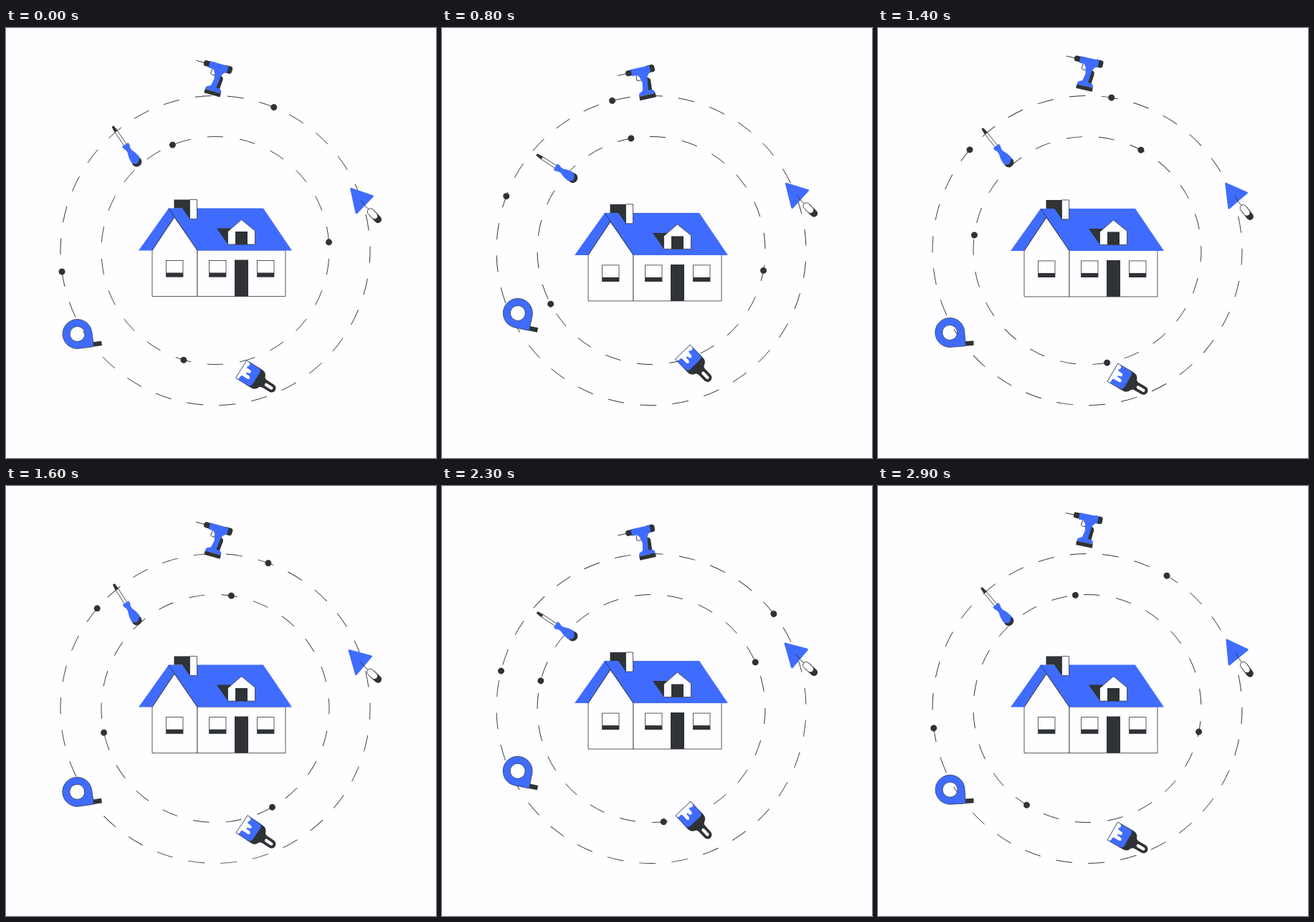
Recreate the animation shown at these times as an HTML page. Size 600 px wide and 600 px high, loop 3000 ms.

```html
<!DOCTYPE html>
<html lang="en">
<head>
<meta charset="utf-8">
<title>Home repair</title>
<style>
  html, body { margin: 0; width: 100%; height: 100%; overflow: hidden; background: #fefdff; }
  svg { display: block; width: 100vw; height: 100vh; }
  .b { fill: #3f6cff; }
  .d { fill: #2f3335; }
  .w { fill: #fefdff; stroke: #2f3335; stroke-width: .8; }
  .l { fill: none; stroke: #2f3335; stroke-width: .9; }
  .o { stroke: #2f3335; stroke-width: .7; stroke-linejoin: round; }
</style>
</head>
<body>
<svg viewBox="0 0 600 600" xmlns="http://www.w3.org/2000/svg">
  <g transform="translate(292 310.5)">
    <circle id="outer" class="l" r="216" pathLength="360" stroke-dasharray="6.1 5.9"/>
    <circle id="inner" class="l" r="159" pathLength="360" stroke-dasharray="8 8.3636"/>
    <g id="dots" class="d">
      <circle r="4.5" cx="159" transform="rotate(-4.2)"/>
      <circle r="4.5" cx="159" transform="rotate(-112)"/>
      <circle r="4.5" cx="159" transform="rotate(-253.9)"/>
    </g>
    <circle id="dotA" class="d" r="4.5" cx="216"/>
    <circle id="dotB" class="d" r="4.5" cx="216"/>
  </g>

  <g id="house">
    <path class="w" d="M204 374.5V310L235 264L267 310V374.5Z"/>
    <path class="w" d="M267 310H390V374.5H267Z"/>
    <path class="b" d="M227 251.5H359L399 310.5H267L235 263.5L204 310.5H185Z"/>
    <path class="l" d="M227 251.5L267 310.5M235 263.5L204 310.5"/>
    <path class="d" d="M234.5 239.5H256.5V266.5L246 251.5H234.5Z"/>
    <path class="w" d="M256.5 239.5H266.5V266.5H256.5Z"/>
    <path class="d" d="M294 279.5H316L309 301Z"/>
    <path class="w" d="M309.5 302V284L328.5 267.5L347.5 283V302Z"/>
    <path class="d" d="M320 284H337V302H320ZM319 323.5H338V374.5H319Z"/>
    <g id="panes"></g>
  </g>

  <g id="drill">
    <path class="l" d="M-34.5 -40H-22M-9 -35L-10 -28Q-8 -26 -4 -27"/>
    <rect class="d" x="-23" y="-44" width="11" height="8" rx="3"/>
    <rect class="d" x="5" y="-45" width="13" height="10.5" rx="3.5"/>
    <path class="d" d="M4 -29Q9 -28 9 -24L8 -10H2Z"/>
    <path class="b" d="M-15 -44.5H11.5V-35Q7 -34 5 -28L3 -11L8 -10.5Q11.5 -9.5 11.5 -5H-11.5Q-11.5 -9.5 -8 -10.5L-5 -12L-3 -22L-5 -31L-8 -35H-15Z"/>
    <rect class="d" x="-11.5" y="-5" width="23" height="5.5"/>
  </g>

  <g id="trowel">
    <path class="b" d="M-35.5 -44Q-35 -45.5 -33.5 -44.8L-4 -33Q-2.5 -32 -4 -30.7L-27.5 -8.7Q-29.3 -7.5 -30 -9.5Z"/>
    <path class="l" d="M-21 -27L-16 -19L-10.5 -13"/>
    <path d="M-7 -8.5L1 1" stroke="#2f3335" stroke-width="10" stroke-linecap="round"/>
    <rect class="w" x="-18" y="-4.5" width="17" height="9" rx="4.5" transform="rotate(50)"/>
  </g>

  <g id="tape">
    <path class="b o" fill-rule="evenodd" d="M-31.5 -37.5A20.5 20.5 0 0 1 -11 -17V3.5H-31.5A20.5 20.5 0 0 1 -31.5 -37.5ZM-31.5 -27.5A10.5 10.5 0 0 0 -31.5 -6.5A10.5 10.5 0 0 0 -31.5 -27.5Z"/>
    <rect class="d" x="-11" y="-3" width="11.5" height="6.5"/>
  </g>

  <g id="driver">
    <rect class="w" x="26" y="-2" width="26" height="4"/>
    <path class="d" d="M51 -2.2H54L60 -1.5V1.5L54 2.2H51Z"/>
    <ellipse class="d" cx="0" rx="6.8" ry="7"/>
    <path class="b" d="M4 -7Q11 -6.5 18 -3.4L22 -3.5L25 -5H29V5H25L22 3.5L18 3.4Q11 6.5 4 7Q0 5 -2 0Q-2 -6 4 -7Z"/>
  </g>

  <g id="brush">
    <path class="d" d="M0 -6H10Q15 -6 16 -9Q18 -14.5 24 -14.8H32V14.8H24Q18 14.5 16 9Q15 6 10 6H0A6 6 0 0 1 0 -6Z"/>
    <rect x="-2" y="-2.2" width="13" height="4.4" rx="2.2" fill="#fefdff"/>
    <path class="b o" d="M50 -14.5H30Q25 -14.5 25 -9V9Q25 14.5 30 14.5H50Z"/>
    <path fill="#fefdff" d="M49.5 -14V14H46.5Q43 13.5 43 11Q43 8.500 45 7.5Q45 5.500 40 5.5Q36 5.500 36 3Q36 .5 40 .5Q42 0 41 -2H37Q33 -2.500 33 -4.8Q33 -7 37 -7H44Q46 -8 45.5 -10Q45 -14 47.5 -14Z"/>
  </g>
</svg>
<script>
const $ = id => document.getElementById(id);
const put = (id, t) => $(id).setAttribute('transform', t);

$('panes').innerHTML = [223.5, 283.5, 350.5].map(x =>
  `<rect class="w" x="${x}" y="324.5" width="23.5" height="22.5"/>` +
  `<rect class="d" x="${x}" y="341.5" width="23.5" height="6"/>`).join('');

// Eased swing: 1 at the peak, 0 half a period later.
function swing(n, period, peak) {
  let p = (((n - peak) % period + period) % period) / (period / 2);
  if (p > 1) p = 2 - p;
  return 1 - p * p * (3 - 2 * p);
}

// x of the pivot; y and angle as [lowest, range, peak]; turn = angle of the drawing at rest
const tools = {
  drill:  { x: 287.5, y: [78, 39, 13],        a: [-12.5, 28.5, 1.5], turn: 0 },
  trowel: { x: 518,   y: [252.3, 21.5, 9],    a: [32.9, 28, 35],     turn: -52.3 },
  tape:   { x: 133,   y: [420.5, 19.3, 44],   a: [19.4, 21.6, 26],   turn: -28.3 },
  driver: { x: 182.5, y: [186.7, 23, 22],     a: [32, 26, 4],        turn: 180 },
  brush:  { x: 370.5, y: [481.3, 25.7, 39],   a: [30, 19.5, 18],     turn: 180 }
};

function draw(n) {
  const at = ([low, range, peak]) => low + range * swing(n, 45, peak);
  const loop = n / 90;
  // The rings creep on by whole dashes: two outside, three inside.
  put('outer', `rotate(${-13.5 - 24 * loop})`);
  put('inner', `rotate(${-94 - 3 * 360 / 22 * loop})`);
  put('dots', `rotate(${-360 * loop})`);
  put('dotA', `rotate(${-37.6 - 67 * swing(n, 90, 24)})`);
  put('dotB', `rotate(${-139.1 - 48.8 * swing(n, 90, 89)})`);
  put('house', `translate(0 ${14 * swing(n, 90, 21.5) - 7.5})`);
  for (const id in tools) {
    const t = tools[id];
    put(id, `translate(${t.x} ${at(t.y)}) rotate(${at(t.a) + t.turn})`);
  }
}

// Thirty pictures per loop, spread over 89 motion steps.
const start = performance.now();
function tick() {
  const i = Math.floor((performance.now() - start) / 100) % 30;
  draw(Math.round(i * 89 / 30));
  requestAnimationFrame(tick);
}
tick();
</script>
</body>
</html>
```
